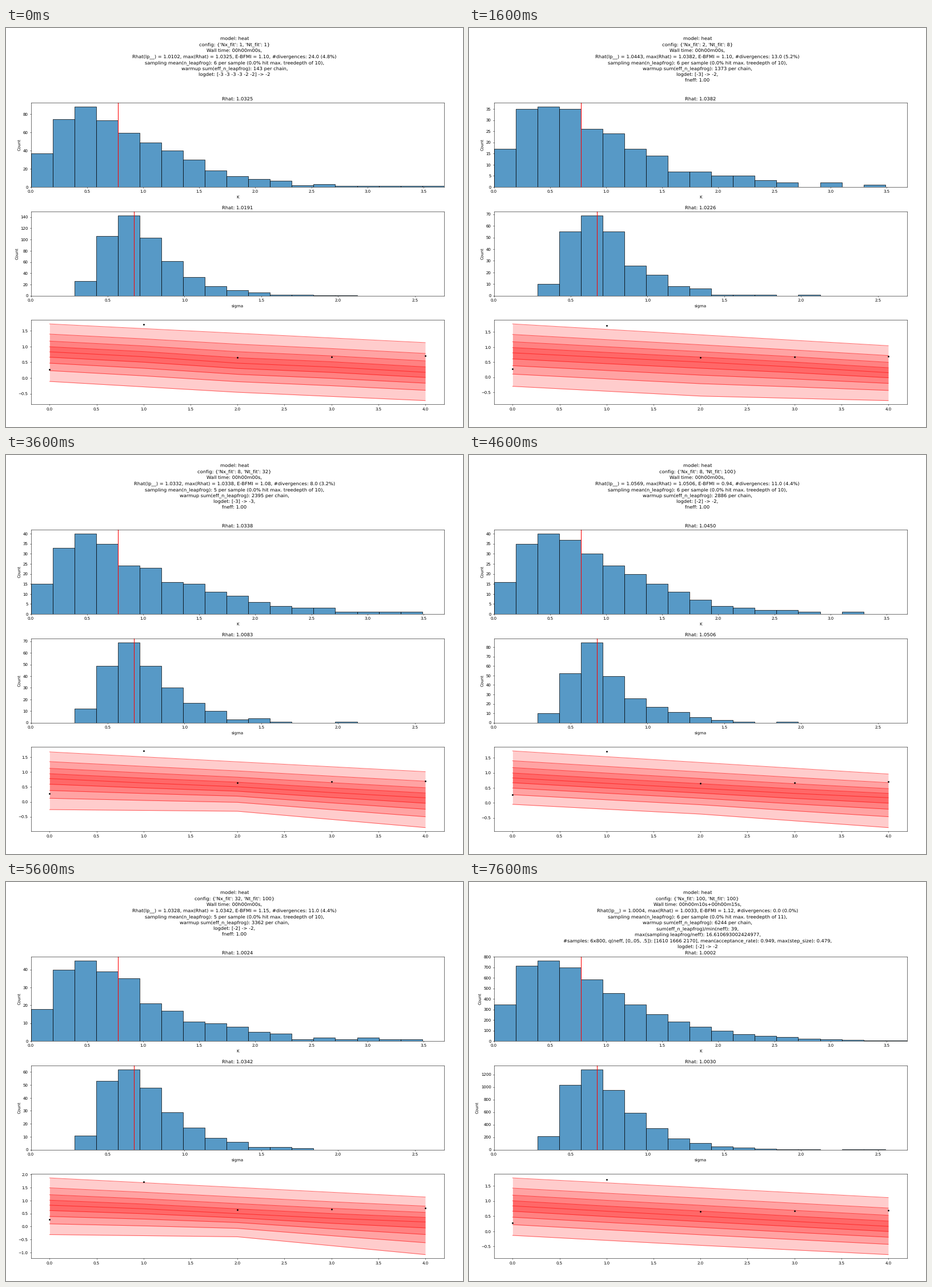
Recreate the animation shown at these times as a matplotlib script. Size 800 by 700 pixels, loop 8.1 s.

```python
from math import erf, exp, log, sqrt

import numpy as np
import matplotlib.pyplot as plt
from matplotlib.animation import FuncAnimation

plt.rcParams.update({"font.family": "DejaVu Sans", "text.hinting": "none"})

W, H, DPI = 800, 700, 50
BINS, LAST = 19, 16
K_MAX, K_TRUE = 3.681, 0.776
S_MAX, S_TRUE = 2.689, 0.671
DATA = [0.275, 1.713, 0.65, 0.675, 0.70]
T = np.arange(5)

# Per key step: Rhat of lp, K and sigma; E-BFMI; divergences and peak counts per 252 samples;
# leapfrogs; warmup; top quantile at t = 0, 4; low quantile at t = 0, 2, 4.
FIELDS = ("lp", "rk", "rs", "bfmi", "div", "k_peak", "s_peak", "leap", "warm",
          "top0", "top4", "low0", "low2", "low4")
KEYS = {
    0: (1.0102, 1.0325, 1.0191, 1.10, 12, 44, 71.5, 6, 143, 1.72, 1.125, -0.11, -0.455, -0.72),
    4: (1.0443, 1.0382, 1.0226, 1.10, 13, 36, 69, 6, 1373, 1.77, 1.045, -0.305, -0.63, -0.78),
    6: (1.0625, 1.0082, 1.0319, 1.09, 13, 45, 62, 6, 1893, 1.97, 0.94, -0.01, -0.37, -0.82),
    8: (1.0332, 1.0338, 1.0083, 1.08, 8, 40, 69, 5, 2395, 1.68, 1.015, -0.26, -0.315, -0.865),
    10: (1.0569, 1.0450, 1.0506, 0.94, 11, 40, 85, 6, 2886, 1.73, 0.96, -0.05, -0.375, -0.825),
    12: (1.0328, 1.0024, 1.0342, 1.15, 11, 45, 62, 5, 3362, 1.87, 1.135, -0.31, -0.395, -1.08),
    16: (1.0004, 1.0002, 1.0030, 1.12, 0, 40, 67.2, 6, 6244, 1.765, 1.115, -0.135, -0.465, -0.77),
}


def params(step):
    return {name: np.interp(step, list(KEYS), [row[i] for row in KEYS.values()])
            for i, name in enumerate(FIELDS)}


def sample_size(step):
    return 504 if step == 0 else 252 if step < 15 else 4800


def gamma_cdf(x, scale=0.44):
    return 1 - exp(-x / scale) * (1 + x / scale)


def lognormal_cdf(x, shift=0.2, median=0.494, s=0.466):
    if x <= shift:
        return 0.0
    return 0.5 * (1 + erf(log((x - shift) / median) / (s * sqrt(2))))


def counts(cdf, x_max, size, peak, rng):
    """Expected bin counts with some sampling noise and a given tallest bar."""
    c = size * np.diff([cdf(x) for x in np.linspace(0, x_max, BINS + 1)])
    mode = c.argmax()
    c = c + 0.5 * np.sqrt(np.minimum(c, 40)) * rng.standard_normal(BINS)
    peak = peak * size / 252
    c = np.clip(c, 0, peak - 1)
    c[mode] = peak
    return np.round(c)


def deciles(p, rng):
    """Nine curves fanning out from a falling median, wider towards the tails."""
    mid = 0.82 - 0.165 * T + rng.normal(0, 0.015, 5)
    top = np.interp(T, [0, 4], [p["top0"], p["top4"]])
    low = np.interp(T, [0, 2, 4], [p["low0"], p["low2"], p["low4"]])
    reach = np.tan(0.9 * np.linspace(1, 0, 5)) / np.tan(0.9)
    upper = [mid + f * (top - mid) for f in reach]
    lower = [mid + f * (low - mid) for f in reach[-2::-1]]
    return upper + lower


def config(step):
    def doubled(at):
        return min(100, 2 ** sum(s <= step for s in at))
    return doubled((3, 5, 7, 11, 12, 13, 14)), doubled((1, 2, 4, 6, 8, 9, 10))


def header(step, p):
    size, full = sample_size(step), step >= 15
    div = round(p["div"] * size / 252) if not full else 0
    nx, nt = config(step)
    wall = f"00h00m10s+00h00m{15 if step == LAST else 7:02d}s" if full else "00h00m00s"
    worst = max(p["rk"], p["rs"]) + (0.0003 if full else 0)
    start = "-3 -3 -3 -3 -2 -2" if step == 0 else "-3" if step < 9 else "-2"
    logdet = f"logdet: [{start}] -> {-3 if 5 <= step <= 8 else -2}"
    lines = [
        "model: heat",
        f"config: {{'Nx_fit': {nx}, 'Nt_fit': {nt}}}",
        f"Wall time: {wall},",
        f"Rhat(lp__) = {p['lp']:.4f}, max(Rhat) = {worst:.4f}, E-BFMI = {p['bfmi']:.2f}, "
        f"#divergences: {div:.1f} ({100 * div / size:.1f}%)",
        f"sampling mean(n_leapfrog): {p['leap']:.0f} per sample "
        f"(0.0% hit max. treedepth of {11 if full else 10}),",
        f"warmup sum(eff_n_leapfrog): {p['warm']:.0f} per chain,",
    ]
    if full:
        lines += [
            "sum(eff_n_leapfrog)/min(neff): 39,",
            "max(sampling leapfrog/neff): 16.610693002424977,",
            "#samples: 6x800, q(neff, [0,.05, .5]): [1610 1666 2170], "
            "mean(acceptance_rate): 0.949, max(step_size): 0.479,",
        ]
    if full or step == 0:
        return lines + [logdet]
    return lines + [logdet + ",", "fneff: 1.00"]


fig = plt.figure(figsize=(W / DPI, H / DPI), dpi=DPI, facecolor="white")
axes = [fig.add_axes([43.5 / W, 1 - (279 + 190.7 * i) / H, 723.3 / W, 148 / H])
        for i in range(3)]
caption = [fig.text(0.5, 1 - (20.8 + 10.5 * i) / H, "", size=12, ha="center", va="baseline")
           for i in range(10)]
shown = None


def hist(ax, c, x_max, truth, rhat, name):
    ax.clear()
    width = x_max / BINS
    on = c > 0
    ax.bar(np.arange(BINS)[on] * width, c[on], width, align="edge", linewidth=1,
           facecolor=("#1f77b4", 0.75), edgecolor="black")
    ax.axvline(truth, color="red")
    ax.set(xlim=(0, x_max), xlabel=name, ylabel="Count", title=f"Rhat: {rhat:.4f}")


def fan(ax, bands):
    ax.clear()
    for i in range(4):
        ax.fill_between(T, bands[i], bands[-1 - i], color="red", alpha=0.2, linewidth=0)
    for q in bands:
        ax.plot(T, q, color="red", alpha=0.55)
    ax.plot(T, DATA, "k.")


def draw(frame):
    global shown
    step = 0 if frame == 0 else 1 + (frame - 1) // 5
    if step == shown:
        return
    shown = step
    p, size, rng = params(step), sample_size(step), np.random.default_rng(step)
    lines = header(step, p)
    for i, text in enumerate(caption):
        text.set_text(lines[i] if i < len(lines) else "")
    hist(axes[0], counts(gamma_cdf, K_MAX, size, p["k_peak"], rng),
         K_MAX, K_TRUE, p["rk"], "K")
    hist(axes[1], counts(lognormal_cdf, S_MAX, size, p["s_peak"], rng),
         S_MAX, S_TRUE, p["rs"], "sigma")
    fan(axes[2], deciles(p, rng))


anim = FuncAnimation(fig, draw, frames=81, interval=100, repeat=True, repeat_delay=0)
plt.show()
```
